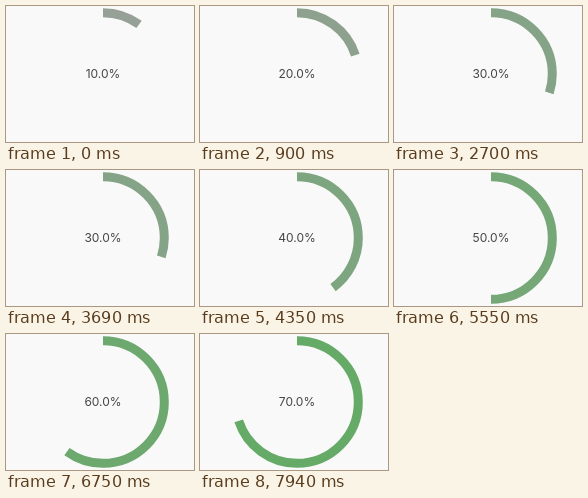
These frames come from a looping animation (188 by 136 pixels, 8 s). An HTML page with a canvas:

```html
<!DOCTYPE html>
<html lang="en">
<head>
<meta charset="utf-8">
<title>Progress ring</title>
<style>
html, body { margin: 0; width: 100%; height: 100%; overflow: hidden; background: #f9f9f9; }
canvas { display: block; }
</style>
</head>
<body>
<canvas id="stage"></canvas>
<script>
const canvas = document.getElementById('stage');
const ctx = canvas.getContext('2d');
const LOOP = 8000;
const STEPS = [0, 900, 2700, 4350, 5550, 6750, 7940];
const CX = 97, CY = 68, RADIUS = 61.3, THICK = 9;
const GREY = [158, 158, 158], GREEN = [76, 175, 80];

const mix = (a, b, p) => `rgb(${a.map((v, i) => Math.round(v + (b[i] - v) * p)).join(',')})`;

const scale = window.devicePixelRatio || 1;
canvas.width = 188 * scale;
canvas.height = 136 * scale;
canvas.style.width = '188px';
canvas.style.height = '136px';
ctx.scale(scale, scale);

function draw(p) {
  ctx.fillStyle = '#f9f9f9';
  ctx.fillRect(0, 0, 188, 136);

  ctx.strokeStyle = mix(GREY, GREEN, p);
  ctx.lineWidth = THICK;
  ctx.beginPath();
  ctx.arc(CX, CY, RADIUS, -Math.PI / 2, -Math.PI / 2 + p * 2 * Math.PI);
  ctx.stroke();

  ctx.fillStyle = '#444';
  ctx.font = '400 12px Inter, sans-serif';
  ctx.textAlign = 'center';
  ctx.textBaseline = 'alphabetic';
  ctx.fillText((p * 100).toFixed(1) + '%', CX, 72);
}

const start = performance.now();

function tick() {
  const t = (performance.now() - start) % LOOP;
  const done = STEPS.filter(s => s <= t).length;
  draw(done / 10);
  requestAnimationFrame(tick);
}
tick();
</script>
</body>
</html>
```
